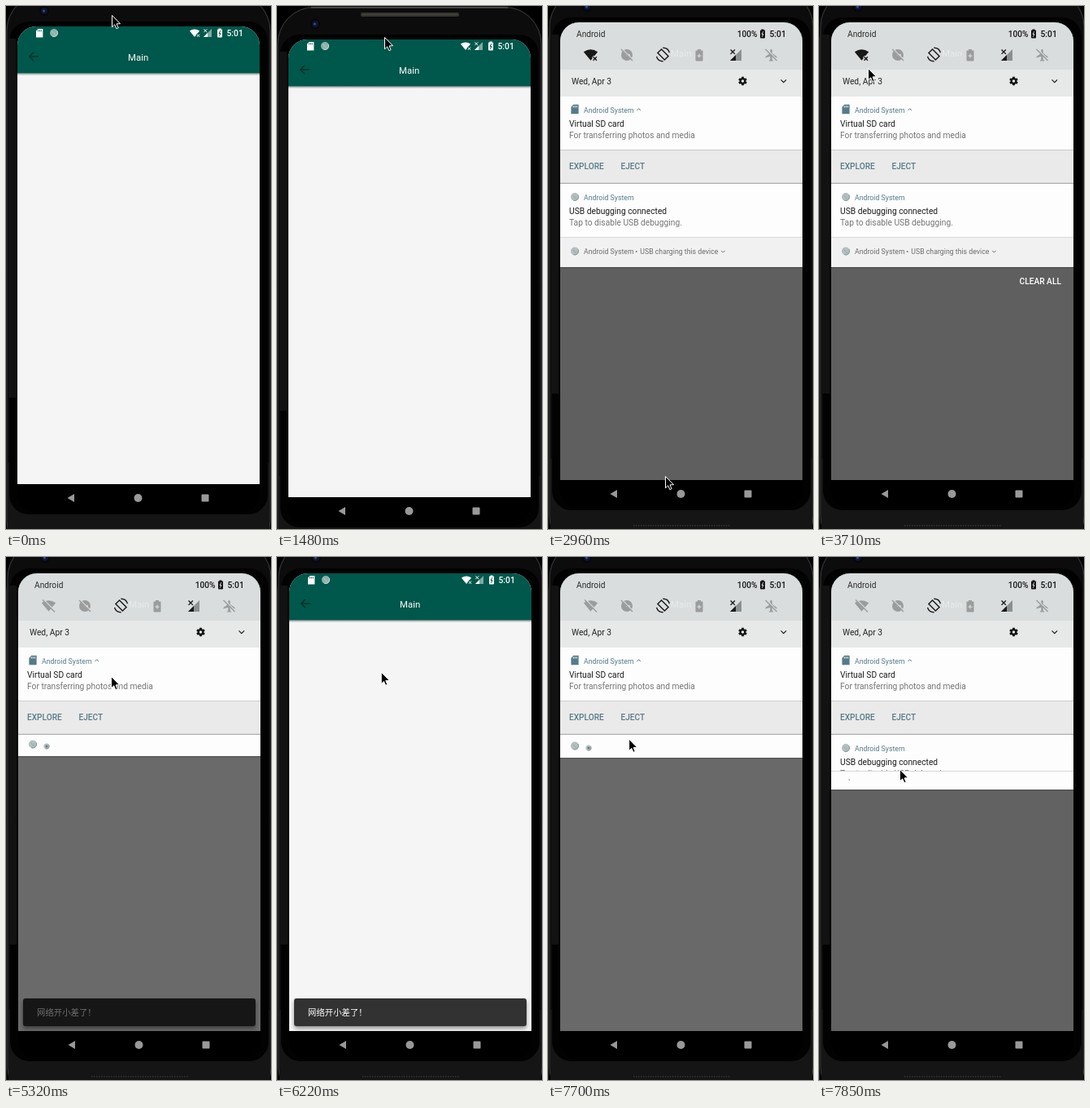
Recreate the animation shown at these times as an HTML page with a canvas. Size 326 by 641 pixels, loop 7990 ms.

```html
<!DOCTYPE html>
<html lang="en">
<head>
<meta charset="utf-8">
<title>Network switch</title>
<style>
html, body { margin: 0; width: 100%; height: 100%; overflow: hidden; background: #000; }
canvas { display: block; width: 326px; height: 641px; }
</style>
</head>
<body>
<canvas id="stage" width="326" height="641"></canvas>
<script>
const ctx = document.getElementById('stage').getContext('2d');
const LOOP = 7990, STEP = 147.8, LAST_STEP = 53;
const FULL = 320, PEEK = 37;
const TEAL = '#557b88', INK = '#181818', DIM = '#9b9d9d', PANEL = '#dadddd';
const SANS = 'Roboto, "Noto Sans", sans-serif';
const CJK = '"Noto Sans CJK SC", "Noto Sans CJK", sans-serif';

// Pointer gestures: first step, last step, and where the move ends
const MOVES = [
  { from: 2, to: 5, x: 132, y: 22 },
  { from: 7, to: 10, x: 132, y: 38 },
  { from: 10, to: 13, x: 132, y: 17 },
  { from: 14, to: 16, x: 132, y: 21 },
  { from: 17, to: 20, x: 144, y: 576 },
  { from: 20, to: 25, x: 60, y: 76 },
  { from: 25, to: 27, x: 52, y: 48 },
  { from: 29, to: 33, x: 130, y: 310 },
  { from: 33, to: 36, x: 129, y: 146 },
  { from: 41, to: 49, x: 100, y: 21 },
  { from: 49, to: 53, x: 99, y: 260 }
];

const clamp = (v, lo, hi) => Math.max(lo, Math.min(hi, v));
const ramp = (s, from, to) => clamp((s - from) / (to - from), 0, 1);
const smooth = p => p * p * (3 - 2 * p);

function pointer(s) {
  let x = 130, y = 11;
  for (const m of MOVES) {
    const p = smooth(ramp(s, m.from, m.to));
    x += (m.x - x) * p;
    y += (m.y - y) * p;
  }
  return { x, y };
}

// The window follows the pointer while it is dragged
const windowShift = s => pointer(clamp(s, 7, 13)).y - 22;

// The shade follows the pointer when pulled or pushed
function shadeBottom(s) {
  const { y } = pointer(s);
  if (s < 18 || (s >= 38 && s < 49)) return 0;
  if (s <= 20 || s >= 49) return Math.min(FULL, PEEK + (y - 21) * 1.038);
  if (s < 33) return FULL;
  return Math.min(FULL, y + 98) * (1 - ramp(s, 36, 38));
}

function rect(x, y, w, h, color) {
  ctx.fillStyle = color;
  ctx.fillRect(x, y, w, h);
}

function round(x, y, w, h, r, color) {
  ctx.beginPath();
  ctx.roundRect(x, y, w, h, r);
  ctx.fillStyle = color;
  ctx.fill();
}

function disc(x, y, r, color) {
  ctx.beginPath();
  ctx.arc(x, y, r, 0, 7);
  ctx.fillStyle = color;
  ctx.fill();
}

function arc(x, y, r, from, to, color, width) {
  ctx.beginPath();
  ctx.arc(x, y, r, from, to);
  ctx.strokeStyle = color;
  ctx.lineWidth = width;
  ctx.stroke();
}

function path(points, close) {
  ctx.beginPath();
  points.forEach(([x, y]) => ctx.lineTo(x, y));
  if (close) ctx.closePath();
}

function poly(points, color) {
  path(points, true);
  ctx.fillStyle = color;
  ctx.fill();
}

function line(points, color, width = 1.2) {
  path(points);
  ctx.strokeStyle = color;
  ctx.lineWidth = width;
  ctx.stroke();
}

function text(str, x, y, size, color, weight = 400, family = SANS) {
  ctx.font = `${weight} ${size}px ${family}`;
  ctx.fillStyle = color;
  ctx.fillText(str, x, y);
}

function place(x, y, scale, draw) {
  ctx.save();
  ctx.translate(x, y);
  ctx.scale(scale, scale);
  draw();
  ctx.restore();
}

function cross(x, y, r, color, width) {
  line([[x - r, y - r], [x + r, y + r]], color, width);
  line([[x - r, y + r], [x + r, y - r]], color, width);
}

function chevron(x, y, r, dir, color, width) {
  line([[x - r, y - r / 2 * dir], [x, y + r / 2 * dir], [x + r, y - r / 2 * dir]], color, width);
}

function shadow(x, y, w, h, alpha) {
  const fade = ctx.createLinearGradient(0, y, 0, y + h);
  fade.addColorStop(0, `rgba(0,0,0,${alpha})`);
  fade.addColorStop(1, 'rgba(0,0,0,0)');
  rect(x, y, w, h, fade);
}

function sdCard(x, y, scale, color, hole) {
  place(x, y, scale, () => {
    poly([[-1.5, -5], [4, -5], [4, 5], [-4, 5], [-4, -2.5]], color);
    for (let i = -1; i < 2; i++) rect(i * 1.8 - .2, -3.6, .9, 1.8, hole);
  });
}

function badge(x, y, r = 5, base = '#b3bfbf', rim = '#849797') {
  disc(x, y, r, base);
  arc(x, y, r - .5, -.5, 2, rim, 1);
  line([[x - r * .5, y - r * .4], [x + r * .4, y + r * .5]], rim, .6);
}

function wifi(x, y, scale, color) {
  place(x, y, scale, () => {
    ctx.beginPath();
    ctx.moveTo(0, 6.8);
    ctx.lineTo(-8.7, -3.8);
    ctx.quadraticCurveTo(0, -9.6, 8.7, -3.8);
    ctx.closePath();
    ctx.fillStyle = color;
    ctx.fill();
  });
}

function signal(x, y, size, color, faint) {
  poly([[x, y - size], [x, y], [x - size, y]], faint);
  poly([[x - size / 2, y - size / 2], [x - size / 2, y], [x - size, y]], color);
  cross(x - size * .77, y - size * .77, size * .19, color, size / 10);
}

function battery(x, y, color, mark) {
  rect(x - 1.5, y - 5.5, 3, 2, color);
  round(x - 3, y - 4.5, 6, 10, 1, color);
  line([[x + .8, y - 2.8], [x - 1, y + .6], [x + 1, y + .6], [x - .8, y + 3.8]], mark, 1);
}

function strike(x, y, r, color, back) {
  line([[x - r + 1.4, y - r], [x + r, y + r - 1.4]], back, 1.6);
  line([[x - r, y - r], [x + r, y + r]], color, 1.4);
}

function drawBody() {
  rect(0, -40, 326, 720, '#000');
  round(0, -16, 326, 690, 46, '#0c0c0c');
  ctx.beginPath();
  ctx.roundRect(1, -14.5, 324, 690, 45);
  ctx.strokeStyle = '#3a3a3a';
  ctx.lineWidth = 1;
  ctx.stroke();
  line([[42, -14], [284, -14]], '#6a6862', 1.2);
  round(103, -8, 121, 5, 2, '#35342e');
  rect(105, -6, 117, 1, '#48463d');
  rect(2, 560, 322, 110, '#151515');
  round(4, 19, 318, 604, 24, '#020202');
  rect(3, 40, 9, 440, '#121212');
  disc(47, 6, 6, '#06070c');
  disc(47, 6, 4, '#10142a');
  disc(46.5, 6, 1.6, '#314b91');
  for (let x = 104; x < 222; x += 3) rect(x, 641, 1.5, 1.5, '#353535');
}

function drawStatusBar() {
  const green = '#00574b';
  sdCard(41.2, 33.2, 1.05, '#fff', green);
  badge(59, 33, 5, '#8fb0aa', '#d3dfdc');
  wifi(232, 33.2, .7, '#fff');
  cross(236.5, 36.3, 2, green, 2.4);
  cross(236.5, 36.3, 1.6, '#fff', 1);
  signal(253, 38, 10, '#fff', '#7fa9a2');
  battery(263, 33, '#fff', green);
  text('5:01', 271.5, 37.2, 10.3, '#fff', 500);
}

function drawApp() {
  ctx.save();
  ctx.beginPath();
  ctx.roundRect(14, 25, 298, 596, 23);
  ctx.clip();
  rect(14, 25, 298, 596, '#000');
  rect(14, 25, 298, 561, '#f5f5f5');
  rect(14, 25, 298, 57.5, '#00574b');
  shadow(14, 82.5, 298, 3, .35);
  drawStatusBar();

  const dark = '#0a2f29', key = '#999';
  line([[40, 62], [29, 62]], dark, 1.4);
  line([[34, 56.7], [28.8, 62], [34, 67.3]], dark, 1.4);
  text('Main', 150, 66.5, 11.4, '#fff');
  poly([[75.5, 603], [84, 598], [84, 608]], key);
  disc(162.5, 603, 5, key);
  round(240.5, 598.5, 9, 9, 1, key);
  ctx.restore();
}

function drawSnack(k) {
  if (!k) return;
  ctx.save();
  ctx.beginPath();
  ctx.rect(15, 520, 298, 61);
  ctx.clip();
  ctx.globalAlpha = k;
  ctx.translate(0, (1 - k) * 30);
  ctx.shadowColor = 'rgba(0,0,0,.4)';
  ctx.shadowBlur = 5;
  ctx.shadowOffsetY = 3;
  round(21, 541, 286, 34, 3, '#323232');
  ctx.shadowColor = 'transparent';
  text('网络开小差了！', 38, 562, 10.4, '#fff', 400, CJK);
  ctx.restore();
}

function rotateIcon() {
  ctx.rotate(-Math.PI / 4);
  ctx.strokeStyle = INK;
  ctx.lineWidth = 1.4;
  ctx.strokeRect(-3.3, -6, 6.6, 12);
  for (const a of [0, Math.PI]) arc(0, 0, 8.3, a - .8, a + .5, INK, 1.4);
}

function planeIcon() {
  round(-1.2, -7, 2.4, 13, 1.2, DIM);
  poly([[0, -3], [7, 2], [7, 3.6], [0, 1.6], [-7, 3.6], [-7, 2]], DIM);
  poly([[0, 4], [3, 7.4], [-3, 7.4]], DIM);
  strike(0, 0, 7, DIM, PANEL);
}

function quickTiles(online) {
  wifi(52.5, 60, 1, online ? INK : DIM);
  if (online) {
    cross(57.7, 64.5, 2.6, PANEL, 3.2);
    cross(57.7, 64.5, 2.2, INK, 1.4);
  } else {
    strike(52.5, 60, 7.5, DIM, PANEL);
  }

  disc(97, 60, 7, DIM);
  rect(96, 59.2, 5, 1.6, PANEL);
  strike(97, 60, 7, DIM, PANEL);

  place(141.5, 59.5, 1, rotateIcon);

  rect(184, 53, 4, 3, DIM);
  round(181.5, 54.5, 9, 13, 1, DIM);
  rect(183.5, 60.5, 5, 1.2, PANEL);
  rect(185.4, 58.6, 1.2, 5, PANEL);

  signal(238, 67, 14, INK, '#8d9090');
  place(274.5, 60, 1, planeIcon);
}

function gear(x, y) {
  place(x, y, 1, () => {
    for (let i = 0; i < 6; i++) {
      rect(-1.4, -5.3, 2.8, 3, '#111');
      ctx.rotate(Math.PI / 3);
    }
    disc(0, 0, 4, '#111');
    disc(0, 0, 1.7, '#e7e8e8');
  });
}

function drawHeader(online) {
  rect(15, 20, 298, 58, PANEL);
  rect(15, 78, 298, 33, '#e7e8e8');
  text('Main', 151, 62, 11.4, 'rgba(255,255,255,.42)');
  text('Android', 35, 38, 10.2, '#2b2b2b');
  text('100%', 232.7, 38, 10.2, INK, 500);
  battery(264, 34, '#111', PANEL);
  text('5:01', 272.5, 38, 10.3, '#111', 500);
  quickTiles(online);
  text('Wed, Apr 3', 29, 96, 10.25, '#222');
  gear(239.5, 92);
  chevron(289.8, 92, 3.3, 1, '#222', 1.3);
  rect(15, 110, 298, 1, '#d3d5d5');
}

function cardText(y, title, body) {
  rect(15, y, 298, 66, '#fdfdfd');
  text('Android System', 44, y + 20, 8.75, TEAL);
  text(title, 26, y + 37.6, 10.25, '#1c1c1c');
  text(body, 26, y + 51.6, 10.25, '#757575');
}

function drawCards() {
  cardText(110.5, 'Virtual SD card', 'For transferring photos and media');
  sdCard(33, 126.5, 1.15, TEAL, '#fdfdfd');
  chevron(111.7, 126.8, 2.2, -1, TEAL, 1);
  rect(15, 176.5, 298, 40, '#eaeaea');
  text('EXPLORE', 26, 200.3, 10.1, TEAL, 500);
  text('EJECT', 89.5, 200.3, 10.1, TEAL, 500);

  cardText(217.5, 'USB debugging connected', 'Tap to disable USB debugging.');
  rect(15, 216, 298, 1, '#d8d8d8');
  badge(33, 234);

  rect(15, 283, 298, 1, '#d8d8d8');
  rect(15, 284, 298, 36, '#f1f1f1');
  badge(33, 300.5);
  const grey = '#6c6c6c';
  text('Android System', 44, 304, 8.75, grey);
  text('•', 107.3, 304, 8.75, grey);
  text('USB charging this device', 113.3, 304, 8.75, grey);
  chevron(215.4, 301, 2.2, 1, grey, 1);
}

function drawShelf(bottom) {
  const h = Math.min(22, bottom - 20), top = bottom - h;
  rect(15, top, 298, h, '#fdfdfd');
  if (bottom > 255) {
    rect(15, top - 1, 298, 1, '#d8d8d8');
    disc(37.3, bottom - 12, .8, '#777');
  } else if (bottom > 190) {
    badge(33, bottom - 14.5);
    badge(50, bottom - 12, 3.5);
    disc(50, bottom - 12, 1.5, '#777');
  } else {
    const y = top + 8.5;
    sdCard(42, y, 1.05, TEAL, '#fdfdfd');
    badge(60, y);
    disc(77, y, .9, '#666');
  }
}

function drawShade(bottom, clear, online) {
  if (!bottom) return;
  const p = (bottom - PEEK) / (FULL - PEEK);
  ctx.save();
  ctx.beginPath();
  ctx.roundRect(15, 20, 298, 561, [23, 23, 0, 0]);
  ctx.clip();
  rect(15, 20, 298, 561, `rgba(0,0,0,${.61 * (1 - (1 - p) ** 2)})`);
  shadow(15, bottom, 298, 2, .25);
  ctx.globalAlpha = clear;
  text('CLEAR ALL', 246.5, 340.5, 10.2, '#fff', 500);
  ctx.globalAlpha = 1;
  ctx.beginPath();
  ctx.rect(15, 20, 298, bottom - 20);
  ctx.clip();
  drawHeader(online);
  drawCards();
  if (bottom < FULL) drawShelf(bottom);
  ctx.restore();
}

function drawCursor({ x, y }) {
  place(x + .5, y + .5, 1, () => {
    path([[0, 0], [0, 14.3], [3.2, 11.3], [5.4, 16.2], [7.6, 15.2], [5.5, 10.4], [10, 10.2]], true);
    ctx.fillStyle = '#000';
    ctx.fill();
    ctx.strokeStyle = '#fff';
    ctx.lineWidth = 1;
    ctx.stroke();
  });
}

function draw(now) {
  const s = Math.min(LAST_STEP, Math.floor((now % LOOP + 3) / STEP));
  const snack = ramp(s, 30, 32) - ramp(s, 49, 51);
  const clear = ramp(s, 20, 22) - ramp(s, 33, 35);
  ctx.save();
  ctx.translate(s >= 12 ? 1 : 0, Math.round(windowShift(s)));
  drawBody();
  drawApp();
  ctx.restore();
  drawSnack(snack);
  drawShade(Math.round(shadeBottom(s)), clear, s < 29);
  drawCursor(pointer(s));
}

const start = performance.now();
function tick() {
  draw(performance.now() - start);
  requestAnimationFrame(tick);
}
tick();
</script>
</body>
</html>
```
